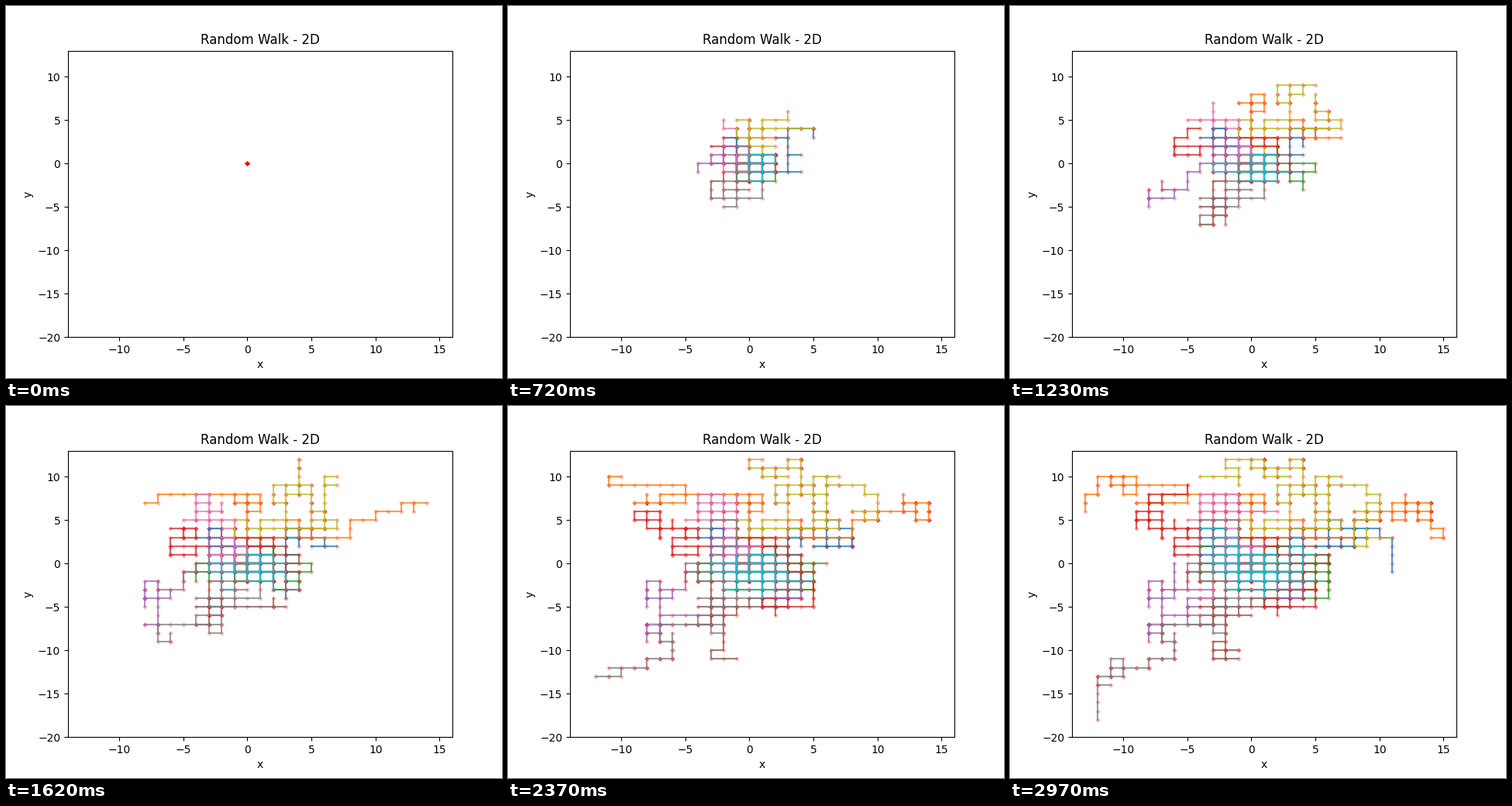
Animation of 640 by 480 pixels, one loop 3000 ms. Source, as a matplotlib script:

```python
import random

import matplotlib.pyplot as plt
from matplotlib.animation import FuncAnimation

FRAMES = 100
STEPS = FRAMES - 2
LEGS = 4
X_LIM, Y_LIM = (-14, 16), (-20, 13)
MOVES = ((1, 0), (-1, 0), (0, 1), (0, -1))
rng = random.Random(4)


def bounds(a, b, limits):
    """Span of a leg with one cell of slack, kept inside the axes."""
    return max(min(a, b) - 1, limits[0] + 1), min(max(a, b) + 1, limits[1] - 1)


def walk(*goals):
    """Random lattice walk from the origin that meets its goals at even times."""
    path = [(0, 0)]
    for k, (gx, gy) in enumerate(goals, 1):
        x, y = path[-1]
        x0, x1 = bounds(x, gx, X_LIM)
        y0, y1 = bounds(y, gy, Y_LIM)
        arrival = STEPS * k // len(goals)
        arrival += (gx + gy + arrival) % 2  # a lattice walk keeps its parity
        while len(path) <= arrival:
            left = arrival - len(path)
            options = [
                (x + dx, y + dy) for dx, dy in MOVES
                if x0 <= x + dx <= x1 and y0 <= y + dy <= y1
                and abs(gx - x - dx) + abs(gy - y - dy) <= left
            ]
            x, y = rng.choice(options)
            path.append((x, y))
    return path


def roam():
    """Walk around the centre, reaching a little further with each leg."""
    reaches = [3 + k // 2 for k in range(1, LEGS + 1)]
    return walk(*((rng.randint(-r, r + 1), rng.randint(-r, r))
                  for r in reaches))


# Walkers that leave the centre, then those that stay around it.
walkers = [
    ("blue", walk((4, 3), (6, 3), (7, 4), (11, -2))),
    ("orange", walk((0, 7), (-6, 8), (-10, 9), (-13, 7))),
    ("orange", walk((3, 4), (13, 7), (12, 6), (15, 3))),
    ("red", walk((-5, 2), (-5, 4), (-9, 5), (-5, 10))),
    ("purple", walk((-5, -2), (-7, -8), (-4, -6), (-6, 0))),
    ("brown", walk((-3, -6), (2, -5), (-2, -10), (1, -6))),
    ("pink", walk((-1, 4), (-4, 8), (-2, 7), (2, 6))),
    ("gray", walk((-3, -5), (-7, -9), (-11, -12), (-12, -19))),
    ("olive", walk((3, 7), (4, 12), (0, 11), (-4, 10))),
    ("olive", walk((7, 4), (6, 9), (9, 6), (12, 3))),
]
walkers += [(color, roam()) for color in (
    "blue", "green", "green", "red", "purple",
    "brown", "pink", "gray", "cyan", "cyan")]

fig, ax = plt.subplots(figsize=(6.4, 4.8), dpi=100)
ax.set(xlim=X_LIM, ylim=Y_LIM, xlabel="x", ylabel="y",
       title="Random Walk - 2D")

trails = [ax.plot([], [], color=f"tab:{color}", lw=1.5, alpha=0.75)[0]
          for color, _ in walkers]
dots = [ax.plot([], [], "rD", ms=3.2, mew=0, alpha=0.3, zorder=1)[0]
        for _ in walkers]


def draw(frame):
    for (_, path), trail, dot in zip(walkers, trails, dots):
        xs, ys = zip(*path[:max(frame, 1)])
        trail.set_data(xs, ys)
        dot.set_data(xs, ys)
    return trails + dots


anim = FuncAnimation(fig, draw, frames=FRAMES, interval=30, repeat=True,
                     repeat_delay=0, blit=False)
plt.show()
```
